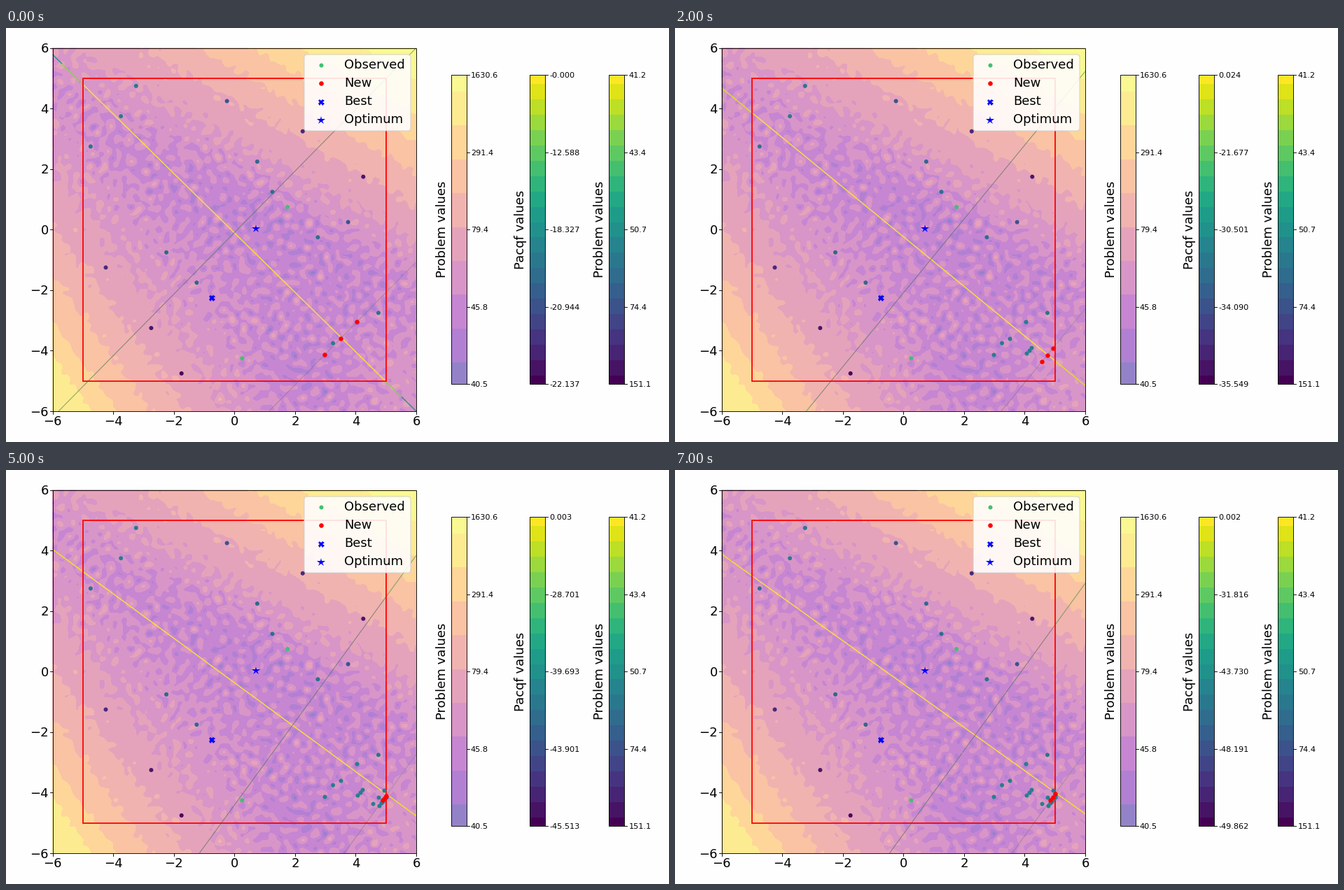
Recreate the animation shown at these times as a matplotlib script. Size 947x592 px, loop 8000 ms.

```python
import numpy as np
import matplotlib.pyplot as plt
from matplotlib.animation import FuncAnimation
from matplotlib.patches import FancyBboxPatch, Rectangle

W, H, DPI = 947, 592, 72
X0, X1, Y0, Y1 = 66.6, 586, 28.5, 548
TOP, BOTTOM = 67, 509
UNIT = 43.27

plt.rcParams["font.family"] = "DejaVu Sans"
viridis, plasma = plt.get_cmap("viridis"), plt.get_cmap("plasma")

fig = plt.figure(figsize=(W / DPI, H / DPI), dpi=DPI, facecolor="#fefefe")
ax = fig.add_axes([0, 0, 1, 1])
ax.set_xlim(0, W)
ax.set_ylim(H, 0)
ax.axis("off")
ax.set_autoscale_on(False)


def px(x):
    return 326.4 + x * UNIT


def py(y):
    return 288.4 - y * UNIT


def line(xs, ys, color="black", lw=0.9, z=5, **kw):
    return ax.plot(xs, ys, color=color, lw=lw, zorder=z, **kw)[0]


def dots(x, y, color, size=36, z=6):
    return ax.scatter(px(x), py(y), s=size, c=color, linewidths=0, zorder=z)


def outline(x, y, w, h, color="black", lw=0.9, z=8):
    ax.add_patch(Rectangle((x, y), w, h, fill=False, ec=color, lw=lw, zorder=z))


# ---- rugged landscape under the plot ----
tones = np.interp(range(10), [0, 1, 8, 9], [0.05, 0.19, 0.92, 0.98])
shades = 0.5 + 0.5 * plasma(tones)[:, :3]


def band_noise(n, freq, width, seed):
    rng = np.random.default_rng(seed)
    f = np.fft.fftfreq(n)
    radius = np.hypot(f[:, None], f[None, :])
    spec = np.fft.fft2(rng.normal(size=(n, n)))
    out = np.fft.ifft2(spec * np.exp(-((radius - freq) / width) ** 2)).real
    return out / out.std()


def bump(x, y, cx, cy, rx, ry, slope=0.0):
    return np.exp(-((x - cx) / rx) ** 2 - ((y - cy - slope * (x - cx)) / ry) ** 2)


def landscape(n=300):
    """Valley between two slopes, in units of colour bands."""
    x, y = np.meshgrid(np.linspace(X0, X1, n), np.linspace(Y0, Y1, n))
    p = (x - X0) - (y - Y0) / 0.57
    q = (y - Y0) - 1.38 * (x - X0)
    upper = np.interp(p, [-240, -80, 20, 128, 208, 285, 355, 443, 520],
                      [2.75, 3.2, 4, 5, 6, 7, 8, 9, 9.7])
    lower = np.interp(q, [-40, 60, 165, 255, 325, 392, 440, 520],
                      [2.75, 3.2, 4, 5, 6, 7, 8, 8.9])
    t = np.maximum(upper, lower)
    dip = (bump(x, y, 370, 270, 180, 65, 0.5) + 0.8 * bump(x, y, 410, 500, 65, 70)
           + 0.4 * bump(x, y, 530, 370, 80, 60))
    t -= 0.7 * np.minimum(dip, 1) * (t < 4.2)
    t += 0.7 * bump(x, y, 580, 510, 90, 90)
    amp = np.interp(t, [2, 3, 4, 5, 9], [0.7, 0.5, 0.28, 0.1, 0.03])
    t += amp * band_noise(n, 0.09, 0.05, 4)
    return x, y, np.clip(t, 0.01, 9.99)


ax.contourf(*landscape(), levels=range(11), colors=shades, zorder=0)

# ---- plot frame, ticks and search box ----
outline(X0, Y0, X1 - X0, Y1 - Y0)
outline(px(-5), py(5), 10 * UNIT, 10 * UNIT, "red", 1.8, 4)
for v in range(-6, 7, 2):
    label = str(v).replace("-", "\u2212")
    line([px(v)] * 2, [Y1, Y1 + 4])
    line([X0 - 4, X0], [py(v)] * 2)
    ax.text(px(v), 567.5, label, size=18, ha="center", va="baseline")
    ax.text(61, py(v) + 6.5, label, size=18, ha="right", va="baseline")

# ---- legend ----
ax.add_patch(FancyBboxPatch((430, 42), 144, 101, fc="white", ec="#cccccc", lw=1,
                            boxstyle="round,pad=4,rounding_size=4",
                            alpha=0.88, zorder=9))
entries = [("Observed", "o", viridis(0.7), 6), ("New", "o", "red", 6.6),
           ("Best", "X", "blue", 9), ("Optimum", "*", "blue", 12)]
for i, (name, mark, color, size) in enumerate(entries):
    y = 53.2 + 26.2 * i
    ax.plot(450.5, y, mark, color=color, ms=size, mew=0, zorder=10)
    ax.text(483.5, y + 4.4, name, size=18, va="baseline", zorder=10)


# ---- colour bars ----
def bar(x, edges, colors, title):
    w = 22
    edges = [BOTTOM, *edges, TOP]
    for low, high, color in zip(edges, edges[1:], colors):
        ax.add_patch(Rectangle((x, high), w, low - high, fc=color, lw=0,
                               antialiased=False))
    outline(x, TOP, w, BOTTOM - TOP)
    ax.text(x - 13, 288, title, size=18, rotation=90, ha="center", va="center")
    texts = []
    for y in np.linspace(BOTTOM, TOP, 5):
        line([x + w, x + w + 4], [y, y])
        texts.append(ax.text(x + w + 6.3, y + 4.2, "", size=11.25, va="baseline"))
    return texts


def set_labels(texts, low, high, digits):
    """Logarithmic scale, shifted so that it starts at 1."""
    for k, text in enumerate(texts):
        value = low - 1 + (1 + high - low) ** (k / 4)
        text.set_text(f"{value:.{digits}f}")


fine = np.linspace(497, 80, 20), viridis(np.linspace(0, 1, 21))
left = bar(635.6, np.linspace(478, 91, 9), shades, "Problem values")
middle = bar(747.8, *fine, "Pacqf values")
right = bar(861.5, *fine, "Problem values")
set_labels(left, 40.5, 1630.6, 1)
set_labels(right[::-1], 41.2, 151.1, 1)

# ---- fixed samples: one per row of a half-unit grid ----
sample_x = np.array([-3.25, -.25, -3.75, 2.25, -4.75, .75, 4.25, 1.25, 1.75, 3.75,
                     2.75, -2.25, -4.25, -1.25, -.75, 4.75, -2.75, 3.25, .25, -1.75])
sample_y = 4.75 - 0.5 * np.arange(20)
sample_tone = np.clip(0.42 - 0.01 * (sample_x + sample_y) ** 2, 0.02, 1)
sample_tone[[8, 18]] = 0.7
dots(sample_x, sample_y, viridis(sample_tone))
ax.plot(px(-0.74), py(-2.25), "X", color="blue", ms=9, mew=0, zorder=7)
ax.plot(px(0.71), py(0.03), "*", color="blue", ms=12, mew=0, zorder=7)


# ---- motion ----
def settle(step, start, end, rate):
    return end + (start - end) * np.exp(-rate * step)


def keyed(step, *values):
    return np.interp(step, [0, 1, 2, 3, 5, 7], values)


def cross_line(step):
    """Ends of the falling line: x at the bottom, y at the right."""
    return settle(step, 75, 350, 0.263), max(Y0, 22 + 20 * step)


def cross_slope(step):
    x, y = cross_line(step)
    return (Y1 - y) / (X1 - x)


def batch(step):
    """Three proposals spread along the direction of the cross line."""
    cx = keyed(step, 3.51, 4.14, 4.75, 4.89, 4.95, 4.93)
    cy = keyed(step, -3.59, -3.99, -4.14, -4.29, -4.17, -4.14)
    spread = keyed(step, 0.76, 0.11, 0.29, 0.18, 0.09, 0.13)
    angle = np.arctan(cross_slope(step))
    s = spread * np.array([1, 0, -1])
    return np.minimum(cx + s * np.cos(angle), 5), cy + s * np.sin(angle)


moving = []


def stretch(a, b, cuts, colors, lw, alpha):
    """Line from a to b, recoloured at the given x positions."""
    xs = [a[0], *cuts, b[0]]
    ys = np.interp(xs, [a[0], b[0]], [a[1], b[1]])
    for i, color in enumerate(colors):
        moving.append(line(xs[i:i + 2], ys[i:i + 2], color, lw, 2, alpha=alpha,
                           solid_capstyle="butt"))


def draw(step):
    while moving:
        moving.pop().remove()

    tone = settle(step, 0.82, 0.98, 0.8)
    outer, tip = viridis(tone), viridis(tone - 0.3 * np.exp(-2 * step))
    stretch((X0, settle(step, 38, 126, 0.39)), (X1, settle(step, 548, 490, 0.5)),
            [80, 110, 543, 565], [tip, outer, "#fbe336", outer, tip], 1.5, 0.95)

    grey, green = (0.35, 0.45, 0.38), (0.35, 0.58, 0.25)
    foot, side = cross_line(step)
    stretch((foot, Y1), (X1, side), [foot + 36 * np.exp(-step), 543],
            [green, grey, green], 1.1, 0.7)

    x, y = batch(step)
    slope = cross_slope(step)
    cx, cy = px(x[1]), py(y[1])
    stretch((cx - (Y1 - cy) / slope, Y1), (X1, cy - (X1 - cx) * slope), [543],
            [(0.5, 0.45, 0.5), (0.5, 0.55, 0.5)], 1, 0.55)

    for past in range(step):
        moving.append(dots(*batch(past), [viridis(0.42)]))
    moving.append(dots(x, y, "red", 42, 7))
    set_labels(middle, keyed(step, -22.137, -29.432, -35.549, -41.034, -45.513, -49.862),
               keyed(step, -0.0004, 0.313, 0.024, 0.007, 0.003, 0.002), 3)
    return moving


anim = FuncAnimation(fig, draw, frames=8, interval=1000, repeat=True,
                     repeat_delay=0, blit=False)
plt.show()
```
